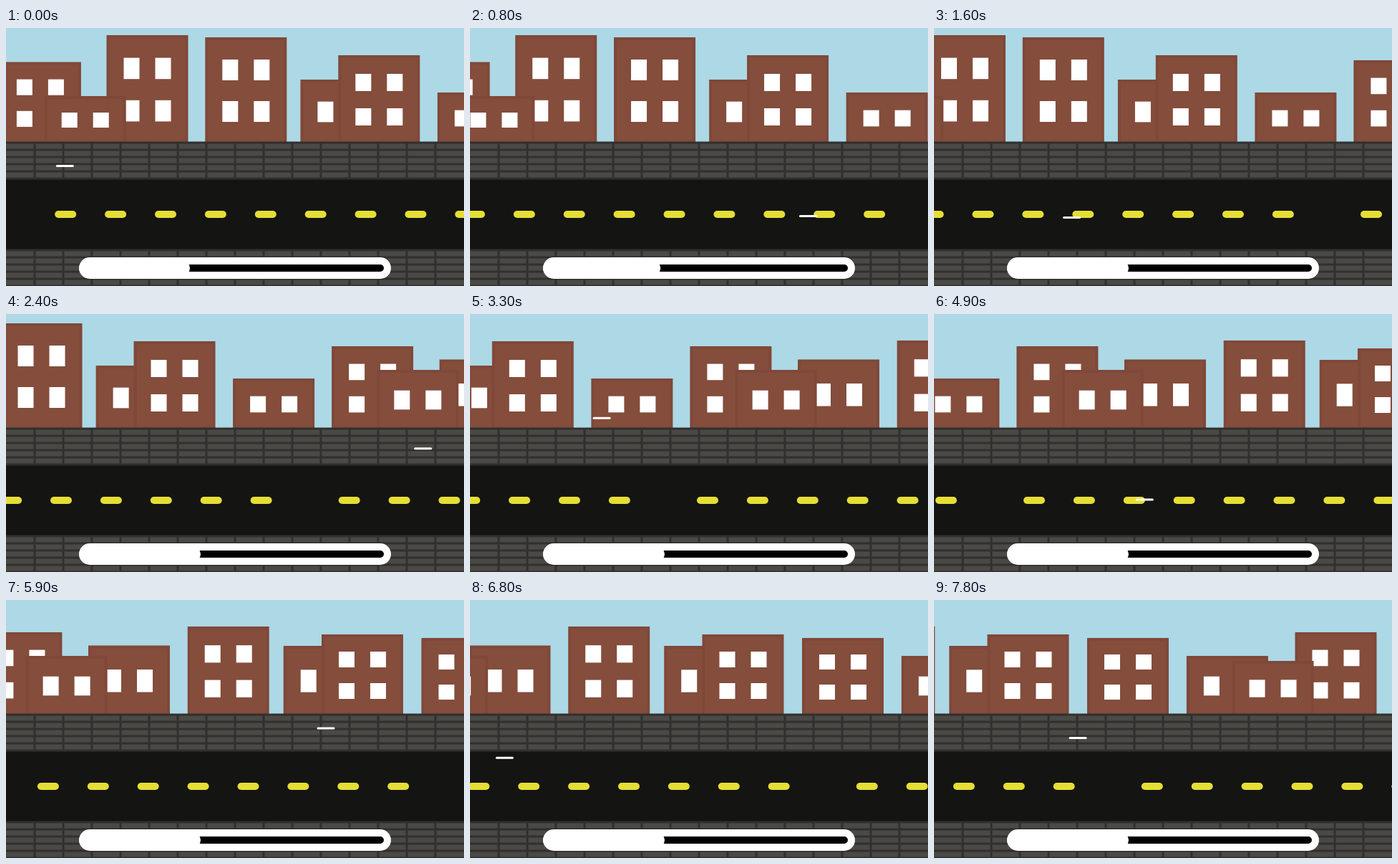
Animation of 640 by 360 pixels, one loop 7900 ms. Source, as an HTML page with a canvas:

```html
<!DOCTYPE html>
<html lang="en">
<head>
<meta charset="utf-8">
<title>City drive</title>
<style>
  html, body { margin: 0; width: 100%; height: 100%; overflow: hidden; background: #add8e6; }
  canvas { display: block; width: 640px; height: 360px; }
</style>
</head>
<body>
<canvas id="stage" width="640" height="360"></canvas>
<script>
const ctx = document.getElementById('stage').getContext('2d');
const LOOP = 7900, STEP = 100;

// key points: [time, distance driven]
const drive = [[0, 0], [1600, 154.5], [3300, 433.5], [4900, 625.5],
               [5900, 776.5], [6800, 893], [7800, 1143], [7900, 1168]];

// Seven plots repeat along the street; each house has its own height.
const plots = [0, 0.184, 0.3615, 0.432, 0.6165, 0.8, 0.884];
const heights = [110.5, 63, 148, 145, 86, 120, 68, 113, 80,
                 94.5, 121, 94, 110, 105, 80, 73, 113];

// Blocks grow slightly longer along the street.
const streetX = s => 142.5 + 748.5 * s + 2.5 * s * s;

// Later plots stand in front of earlier ones.
const houses = plots.flatMap((plot, i) => [-1, 0, 1, 2].map(block => ({
  x: streetX(block + plot),
  h: heights[block * plots.length + i + 2]
}))).filter(house => house.h);

const GUSTS = 14, GUST_TIME = LOOP / GUSTS;

function random(seed) {
  const v = Math.sin(seed * 12.9898 + 4.1) * 43758.5453;
  return v - Math.floor(v);
}

function lerp(keys, t) {
  const i = keys.findIndex(k => k[0] > t);
  const [t0, a] = keys[i - 1], [t1, b] = keys[i];
  return a + (b - a) * (t - t0) / (t1 - t0);
}

function rect(color, x, y, w, h) {
  ctx.fillStyle = color;
  ctx.fillRect(x, y, w, h);
}

function pill(color, x, y, w, h) {
  ctx.fillStyle = color;
  ctx.beginPath();
  ctx.roundRect(x, y, w, h, h / 2);
  ctx.fill();
}

function house(x, h) {
  const top = 160 - h, rows = h > 100 ? 2 : 1, pane = h / (2 * rows + 1);
  rect('#844d3c', x, top, 110, h);
  ctx.strokeStyle = '#804838';
  ctx.lineWidth = 4;
  ctx.strokeRect(x, top, 110, h);
  for (let r = 0; r < rows; r++)
    for (const dx of [22, 66])
      rect('#fff', x + dx, top + pane * (2 * r + 1), 22, pane);
}

function pavement(top) {
  rect('#4a4945', 0, top, 640, 50);
  ctx.strokeStyle = '#30302e';
  ctx.lineWidth = 3;
  ctx.beginPath();
  for (let y = top; y <= top + 50; y += 10) {
    ctx.moveTo(0, y);
    ctx.lineTo(640, y);
  }
  for (let x = 40; x < 640; x += 40) {
    ctx.moveTo(x, top);
    ctx.lineTo(x, top + 50);
  }
  ctx.stroke();
}

// Nine dashes, then a wider gap.
function roadDashes(cam) {
  for (let n = 0; n < 27; n++) {
    const x = 68.2 + 682.3 * Math.floor(n / 9) + 69.9 * (n % 9) - cam;
    if (x > -22 && x < 640) pill('#e5de35', x, 255, 30, 10);
  }
}

// One streak of wind after another, each at its own height.
function wind(t) {
  const lap = t / GUST_TIME + 0.851, n = Math.floor(lap) % GUSTS;
  pill('#fff', 640 - 670 * (lap % 1), 125 + 172 * random(n), 25, 3);
}

function progress(t) {
  pill('#fff', 102, 320, 436, 30);
  pill('#000', 112, 330, 416, 10);
  pill('#fff', 102, 325, 155 + 15 * Math.min(1, t / 1300), 20);
}

function draw(t) {
  const cam = lerp(drive, t);
  rect('#add8e6', 0, 0, 640, 360);
  for (const { x, h } of houses) house(x - cam, h);
  rect('#141413', 0, 210, 640, 100);
  pavement(160);
  pavement(310);
  roadDashes(cam);
  wind(t);
  progress(t);
}

const start = performance.now();
function tick() {
  const t = Math.max(0, performance.now() - start) % LOOP;
  draw(Math.floor(t / STEP) * STEP);
  requestAnimationFrame(tick);
}
tick();
</script>
</body>
</html>
```
